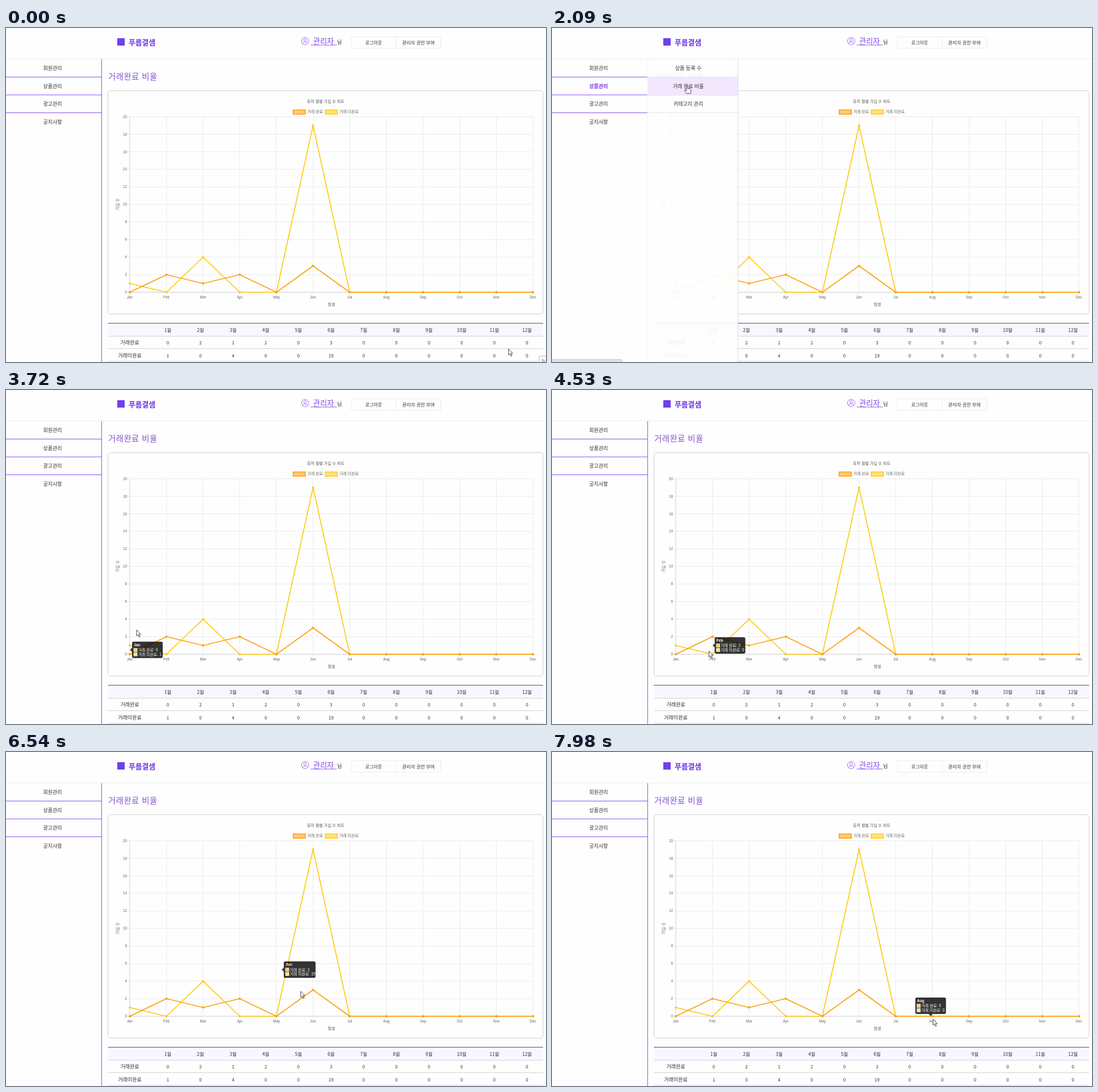
These frames come from a looping animation (951x589 px, 8 s). An HTML page:

```html
<!DOCTYPE html>
<html lang="ko">
<head>
<meta charset="utf-8">
<title>관리자 통계</title>
<style>
  html, body { margin: 0; width: 100%; height: 100%; overflow: hidden; background: #fefefe; }
  svg { display: block; width: 951px; height: 589px; }
  text { font-family: "Noto Sans CJK KR", "Noto Sans CJK", "Noto Sans CJK JP", sans-serif; fill: #333; }
  .num { font-family: "Liberation Sans", sans-serif; fill: #666; }
  .mid { text-anchor: middle; }
  .end { text-anchor: end; }
  .bold { font-weight: 700; }
  .chart { fill: #666; }
  .tip text { fill: #fff; font-weight: 500; }
  .tip .bold { font-weight: 700; }
  .active { font-weight: 700; fill: #7a35ee; }
</style>
</head>
<body>
<svg id="stage" viewBox="0 0 951 589" xmlns="http://www.w3.org/2000/svg"></svg>
<script>
const LOOP = 8000;
const MONTHS = ["Jan", "Feb", "Mar", "Apr", "May", "Jun", "Jul", "Aug", "Sep", "Oct", "Nov", "Dec"];
const SERIES = [
  { name: "거래 완료", row: "거래완료", line: "#ff9f0a", fill: "#ffc978", data: [0, 2, 1, 2, 0, 3] },
  { name: "거래 미완료", row: "거래미완료", line: "#ffcb12", fill: "#ffe083", data: [1, 0, 4, 0, 0, 19] }
];
const PURPLE = "#8f52f3";
const BASE = 466, UNIT = 15.48, LEFT = 218, GAP = 64.55;

const valueAt = (s, i) => s.data[i] || 0;
const px = i => LEFT + i * GAP;
const py = v => BASE - v * UNIT;

// Markup helpers
const text = (x, y, size, str, cls = "", more = "") =>
  `<text x="${x}" y="${y}" font-size="${size}" class="${cls}" ${more}>${str}</text>`;
const line = (x1, y1, x2, y2, color, w = 1) =>
  `<path d="M${x1} ${y1}L${x2} ${y2}" stroke="${color}" stroke-width="${w}"/>`;
const rect = (x, y, w, h, fill, stroke = "none", more = "") =>
  `<rect x="${x}" y="${y}" width="${w}" height="${h}" fill="${fill}" stroke="${stroke}" ${more}/>`;

function header() {
  return line(0, 54.5, 951, 54.5, "#ececec")
    + rect(196, 18, 13, 13, "#7040ea")
    + text(216, 29.5, 12.8, "푸름결샘", "bold", 'style="fill:#6c35e6"')
    + `<g fill="none" stroke="#9a68ee" stroke-width=".9"><circle cx="526.8" cy="23" r="6.5"/>
       <circle cx="526.8" cy="21" r="2.4"/><path d="M522.4 27.6Q523 24.6 526.8 24.6T531.2 27.6"/></g>`
    + text(541, 27.5, 13.2, "관리자", "", 'style="fill:#8048e8;font-weight:300"')
    + line(536.5, 30, 582.5, 30, PURPLE)
    + text(583, 28.3, 9.3, "님")
    + rect(608.5, 15.5, 157, 20, "none", "#ececec") + line(687.5, 15.5, 687.5, 35.5, "#ececec")
    + text(647.5, 29, 8, "로그아웃", "mid") + text(726.5, 29, 8.2, "관리자 권한 부여", "mid");
}

function sidebar() {
  const items = ["회원관리", "상품관리", "광고관리", "공지사항"];
  return line(168.5, 55, 168.5, 589, PURPLE)
    + [86.5, 118, 149.5].map(y => line(0, y, 168, y, PURPLE)).join("")
    + items.map((s, i) => text(82, 74 + i * 31.6, 9, s, "mid", `id="item${i}"`)).join("");
}

function chart() {
  let s = text(180, 91, 14.4, "거래완료 비율", "", 'style="fill:#8456d0;font-weight:500" letter-spacing=".45"')
    + rect(179.5, 110.5, 766.5, 394, "none", "#cfcfcf", 'rx="5"')
    + text(563, 132, 7, "유저 월별 가입 수 차트", "mid", 'style="font-weight:500;fill:#555"');
  SERIES.forEach((d, i) => {
    s += rect(505.7 + i * 56.5, 144.5, 21.5, 7.5, d.fill, d.line, 'stroke-width="1.5"')
      + text(530.5 + i * 56.5, 150, 7, d.name, "chart");
  });
  for (let v = 0; v <= 20; v += 2) {
    s += line(LEFT - 4, py(v), 928, py(v), v ? "#eaeaea" : "#c8c8c8")
      + text(213, py(v) + 2.2, 6.4, v, "num end");
  }
  MONTHS.forEach((m, i) => {
    s += line(px(i), py(20), px(i), BASE + 4, i ? "#eaeaea" : "#d2d2d2")
      + text(px(i), 477.3, 6.4, m, "num mid");
  });
  s += text(573, 489.8, 7, "월별", "chart mid")
    + text(0, 0, 7, "가입 수", "chart mid", 'transform="translate(198.5 311) rotate(-90)"');
  for (const k of [1, 0]) {
    const c = SERIES[k].line;
    s += `<path id="line${k}" fill="none" stroke="${c}" stroke-width="1.7" stroke-linejoin="round"/>
          <path id="dots${k}" stroke="${c}" stroke-width="4" stroke-linecap="round"/>`;
  }
  return s;
}

function table() {
  const col = i => 285 + i * 57.5;
  let s = rect(179.5, 521, 766.5, 22, "#f9f6ff") + line(179.5, 520.7, 946, 520.7, "#6e6e74", 1.3)
    + [543.5, 565.5, 587.7].map(y => line(179.5, y, 946, y, "#d3d3d6")).join("");
  MONTHS.forEach((m, i) => {
    s += text(col(i), 536, 8.4, `${i + 1}월`, "mid");
    SERIES.forEach((d, k) => { s += text(col(i), 558 + k * 22.5, 8, valueAt(d, i), "mid"); });
  });
  SERIES.forEach((d, k) => { s += text(218, 558 + k * 22.5, 9, d.row, "mid"); });
  return s;
}

function submenu() {
  return '<g id="submenu">' + rect(168, 55, 159, 534, "#fefefe", "none", 'opacity=".92"')
    + rect(169, 87, 158, 31, "#f3e6fd", "none", 'id="hover" opacity=".95"')
    + [86.5, 118.5, 149.5].map(y => line(169, y, 327, y, "#e4e4e8")).join("")
    + line(327.5, 55, 327.5, 589, "#dcdce0")
    + ["상품 등록 수", "거래 완료 비율", "카테고리 관리"].map((s, i) => text(240, 74 + i * 31.6, 9, s, "mid")).join("")
    + "</g>";
}

function overlays() {
  const swatch = (y, c) => rect(3, y, 6, 6, c, "#fff", 'stroke-width=".7"');
  return `<g id="status">${rect(-3, 584.5, 131, 10, "#dee1e6", "#c9ccd1", 'rx="2" id="statusBox"')}
      ${text(0, 593.5, 8, "sample page 0000 / goods list", "num")}</g>
    <g id="note">${rect(939.5, 578.5, 20, 20, "#fff", "#bdbdbd")}${text(943, 590, 8, "는")}</g>
    <g id="tip" class="tip"><path id="caret" fill="#000" fill-opacity=".8"/>
      ${rect(0, 0, 54, 29, "#000", "none", 'rx="3" fill-opacity=".8" id="tipBox"')}
      ${text(3, 8.3, 6.6, "", "bold", 'id="tipTitle" style="font-family:Liberation Sans,sans-serif"')}
      ${swatch(11.7, SERIES[0].fill)}${swatch(19.3, SERIES[1].fill)}
      ${text(10.5, 17.4, 6.9, "", "", 'id="tip0"')}${text(10.5, 25, 6.9, "", "", 'id="tip1"')}</g>
    <g id="cursor"><circle id="glow" r="8" fill="#fff34a" fill-opacity=".85"/>
      <g fill="#fff" stroke="#333" stroke-width=".9" stroke-linejoin="round">
      <path id="arrow" d="M0 0V10.6L2.5 8.4L4.3 12.7L6.1 12L4.3 7.8H7.4Z"/>
      <path id="hand" d="M-1 1.2Q-1 0 0 0T1 1.2V5.6L5.4 6.6Q7 7 7 8.8L6 14.6H-.6L-4.4 9.4Q-4.8 7.8 -3.2 8L-1 9.6Z"/></g></g>`;
}

document.getElementById("stage").innerHTML =
  header() + sidebar() + chart() + table() + submenu() + overlays();
const el = {};
document.querySelectorAll("[id]").forEach(n => { el[n.id] = n; });

// Timeline: cursor stops [ms, x, y] and tooltip targets [ms, month]
const PATH = [
  [70, 885, 566], [850, 118, 95], [1000, 118, 95], [1450, 325, 98], [2000, 238, 101], [2560, 238, 101],
  [3350, 230, 423], [3920, 230, 423], [4670, 281, 464], [4800, 283, 469], [5280, 345, 404], [5830, 345, 404],
  [6540, 519, 422], [6680, 520, 424], [7440, 612, 452], [7570, 615, 454], [7980, 671, 471]
];
const TIPS = [[2820, 0], [4200, 1], [5000, 2], [6000, 3], [6210, 4], [6490, 5], [6950, 6], [7767, 7]];
const RELOAD = 2400;

const clamp = v => Math.max(0, Math.min(1, v));
const smooth = u => u * u * (3 - 2 * u);
const outQuart = u => 1 - (1 - clamp(u)) ** 4;
const mix = (a, b, u) => a + (b - a) * u;
const within = (t, a, b) => t >= a && t < b;
const show = (node, on) => node.setAttribute("visibility", on ? "visible" : "hidden");

function cursorAt(t) {
  const i = PATH.findIndex(p => p[0] > t);
  if (i === 0) return PATH[0].slice(1);
  if (i < 0) return PATH[PATH.length - 1].slice(1);
  const a = PATH[i - 1], b = PATH[i], u = smooth((t - a[0]) / (b[0] - a[0]));
  return [mix(a[1], b[1], u), mix(a[2], b[2], u)];
}

function tipTarget(i) {
  const mean = (py(valueAt(SERIES[0], i)) + py(valueAt(SERIES[1], i))) / 2;
  const above = mean > 465;
  return above ? { x: px(i) - 27, y: mean - 33, above } : { x: px(i) + 4, y: mean - 14.5, above };
}

function tipAt(t) {
  let pos = null, month = 0;
  TIPS.forEach(([start, i], k) => {
    if (t < start) return;
    const to = tipTarget(i), from = pos || to;
    const end = k + 1 < TIPS.length ? Math.min(t, TIPS[k + 1][0]) : t;
    const u = outQuart((end - start) / 400);
    pos = { x: mix(from.x, to.x, u), y: mix(from.y, to.y, u), above: to.above };
    month = i;
  });
  return { pos, month };
}

function drawLines(t) {
  const grow = t < RELOAD ? 1 : outQuart((t - RELOAD - 30) / 1000);
  SERIES.forEach((d, k) => {
    const pts = MONTHS.map((_, i) => `${px(i)} ${py(valueAt(d, i) * grow)}`);
    el["line" + k].setAttribute("d", "M" + pts.join("L"));
    el["dots" + k].setAttribute("d", pts.map(p => `M${p}h.01`).join(""));
  });
}

function drawTip(t) {
  const { pos, month } = tipAt(t);
  show(el.tip, pos);
  if (!pos) return;
  el.tip.setAttribute("transform", `translate(${pos.x} ${pos.y})`);
  el.tip.setAttribute("opacity", clamp((t - TIPS[0][0]) / 200));
  el.caret.setAttribute("d", pos.above ? "M23.5 29L27 32.5L30.5 29Z" : "M0 11L-3.5 14.5L0 18Z");
  el.tipBox.setAttribute("width", month === 5 ? 56 : 54);
  el.tipTitle.textContent = MONTHS[month];
  SERIES.forEach((d, k) => { el["tip" + k].textContent = `${d.name}: ${valueAt(d, month)}`; });
}

function drawCursor(t) {
  const [x, y] = cursorAt(t);
  const hand = t < RELOAD && t > 400 && (x < 169 || t > 1000);
  el.cursor.setAttribute("transform", `translate(${x} ${y})`);
  show(el.hand, hand);
  show(el.arrow, !hand);
  show(el.glow, within(t, 870, 1060) || within(t, 2150, 2330));
}

function draw(t) {
  drawLines(t);
  drawTip(t);
  drawCursor(t);
  const open = within(t, 1000, RELOAD);
  show(el.submenu, open);
  el.submenu.setAttribute("opacity", clamp((t - 1000) / 250));
  show(el.hover, open && t > 1200);
  el.item1.setAttribute("class", within(t, 690, RELOAD) ? "mid active" : "mid");
  show(el.status, within(t, 800, 2560));
  el.statusBox.setAttribute("width", t < 1200 ? 131 : 126.5);
  show(el.note, t < 70);
}

const begin = performance.now();
function tick() {
  draw((performance.now() - begin) % LOOP);
  requestAnimationFrame(tick);
}
tick();
</script>
</body>
</html>
```
